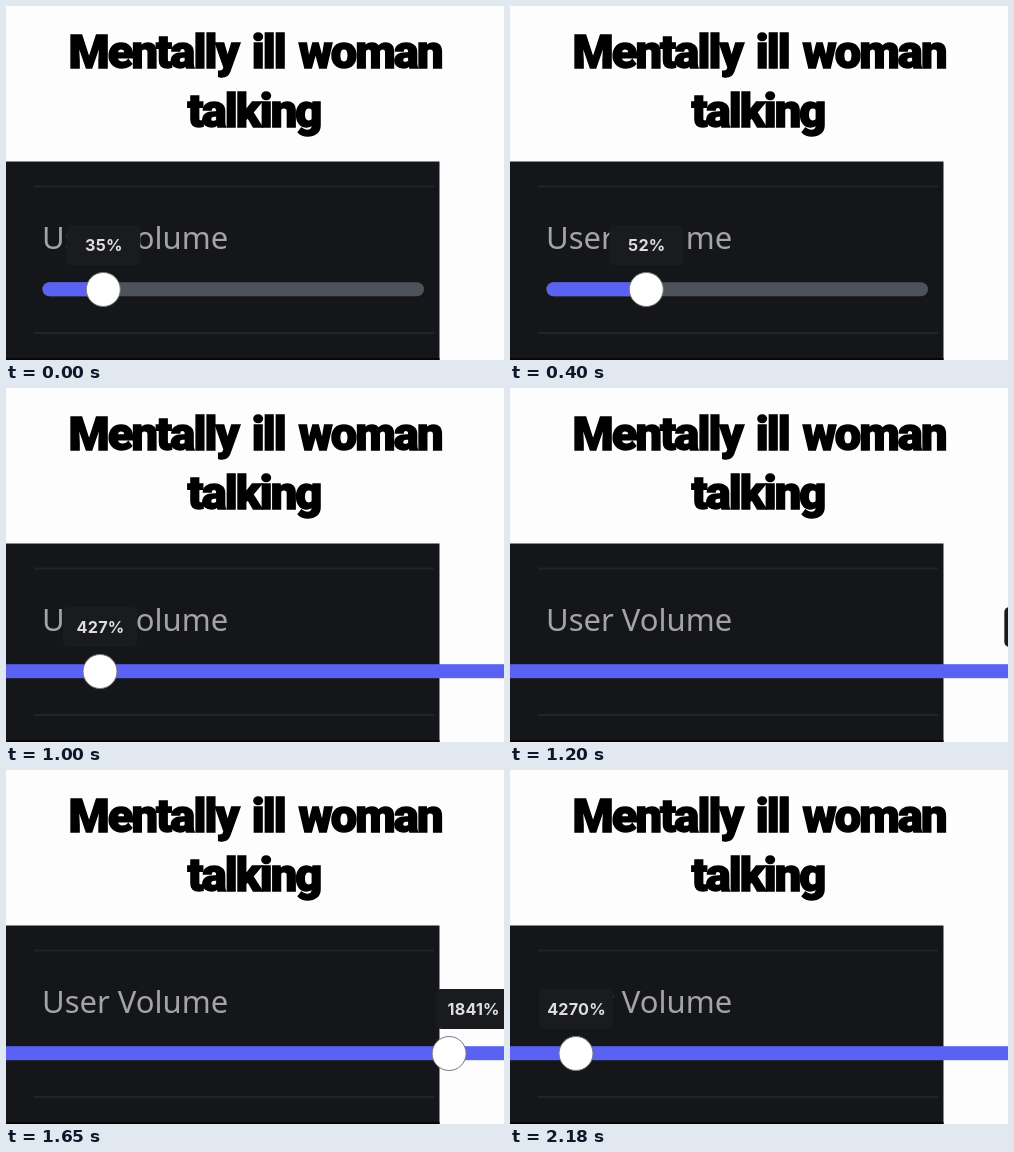
Animation, 498 px wide and 354 px high, one loop 2200 ms. Source, as an HTML page:

```html
<!DOCTYPE html>
<html lang="en">
<head>
<meta charset="utf-8">
<title>User Volume</title>
<style>
  html, body { margin: 0; width: 100%; height: 100%; overflow: hidden; background: #fdfdfd; }
  svg { display: block; width: 498px; height: 354px; }
  .caption {
    font: 900 47px Roboto, "Liberation Sans", sans-serif;
    letter-spacing: -1.9px; word-spacing: 4px; text-anchor: middle;
    fill: #000; stroke: #000; stroke-width: 1.4px;
  }
  .label { font: 500 31px "Noto Sans", "Open Sans", sans-serif; fill: #a4a4a7; }
  .tip { font: 700 16.2px Inter, "DejaVu Sans", sans-serif; letter-spacing: .2px; text-anchor: middle; fill: #dededf; }
</style>
</head>
<body>
<svg viewBox="0 0 498 354">
  <rect width="498" height="354" fill="#fdfdfd"/>
  <text class="caption" x="249" y="61.500">Mentally ill woman</text>
  <text class="caption" x="248" y="121">talking</text>

  <rect y="155.500" width="433.500" height="198.500" fill="#15161a"/>
  <rect y="352" width="433.500" height="2" fill="#0c0407"/>
  <path d="M28 180.500H428M28 327H428" stroke="#222327" stroke-width="2"/>
  <text class="label" x="36" y="243">User Volume</text>

  <rect id="track" x="36.500" y="276.200" width="381.500" height="14" rx="7" fill="#4e525a"/>
  <rect id="fill" y="276.200" height="14" fill="#5a62f3"/>
  <g id="tip">
    <rect x="-37" y="219" width="74" height="40" rx="5" fill="#1a1b1f"/>
    <text id="value" class="tip" x=".5" y="245.200"></text>
  </g>
  <circle id="knob" cy="283.500" r="17" fill="#fff" stroke="#77777b"/>
</svg>
<script>
const LOOP = 2200, STEP = 50;
const START = 36.5, PX_PER_PERCENT = 1.905;
const EXIT = 535, LAP = 575;

// time, distance travelled by the knob, percent, lead of the tooltip
const KEYS = [
  [650, 427, 204, 0],
  [1000, 94 + 2 * LAP, 427, 0],
  [1450, 479 + 3 * LAP, 1340, 24],
  [1900, -33 + 6 * LAP, 2740, 24],
  [2180, 66 + 7 * LAP, 4270, 0]
];

const byId = id => document.getElementById(id);
const track = byId("track"), fill = byId("fill"), tip = byId("tip");
const value = byId("value"), knob = byId("knob");
const mix = (a, b, k) => a + (b - a) * k;

function hold(t) {
  if (t < 100) return 0;
  if (t >= 2180) return 2180;
  return Math.min(2100, Math.floor(t / STEP) * STEP);
}

function pose(t) {
  if (t < 650) {
    const x = 97.3 + 330 * (t / 650) ** 4.4;
    const percent = t ? (x - START) / PX_PER_PERCENT : 35;
    return { x, percent, lead: 0 };
  }
  let i = 0;
  while (i < KEYS.length - 2 && t >= KEYS[i + 1][0]) i++;
  const [t0, x0, p0, l0] = KEYS[i], [t1, x1, p1, l1] = KEYS[i + 1];
  const k = (t - t0) / (t1 - t0);
  return { x: mix(x0, x1, k), percent: p0 * (p1 / p0) ** k, lead: mix(l0, l1, k) };
}

function draw(t) {
  const { x: travel, percent, lead } = pose(t);
  const wrapped = travel >= EXIT;
  const x = wrapped ? (travel + LAP - EXIT) % LAP + EXIT - LAP : travel;

  track.setAttribute("visibility", wrapped ? "hidden" : "visible");
  fill.setAttribute("x", wrapped ? 0 : START);
  fill.setAttribute("width", wrapped ? 498 : x - START);
  fill.setAttribute("rx", wrapped ? 0 : 7);
  knob.setAttribute("cx", x);
  tip.setAttribute("transform", `translate(${x + lead} 0)`);
  value.textContent = Math.round(percent) + "%";
}

const begin = performance.now();
function tick() {
  draw(hold((performance.now() - begin) % LOOP));
  requestAnimationFrame(tick);
}
tick();
</script>
</body>
</html>
```
